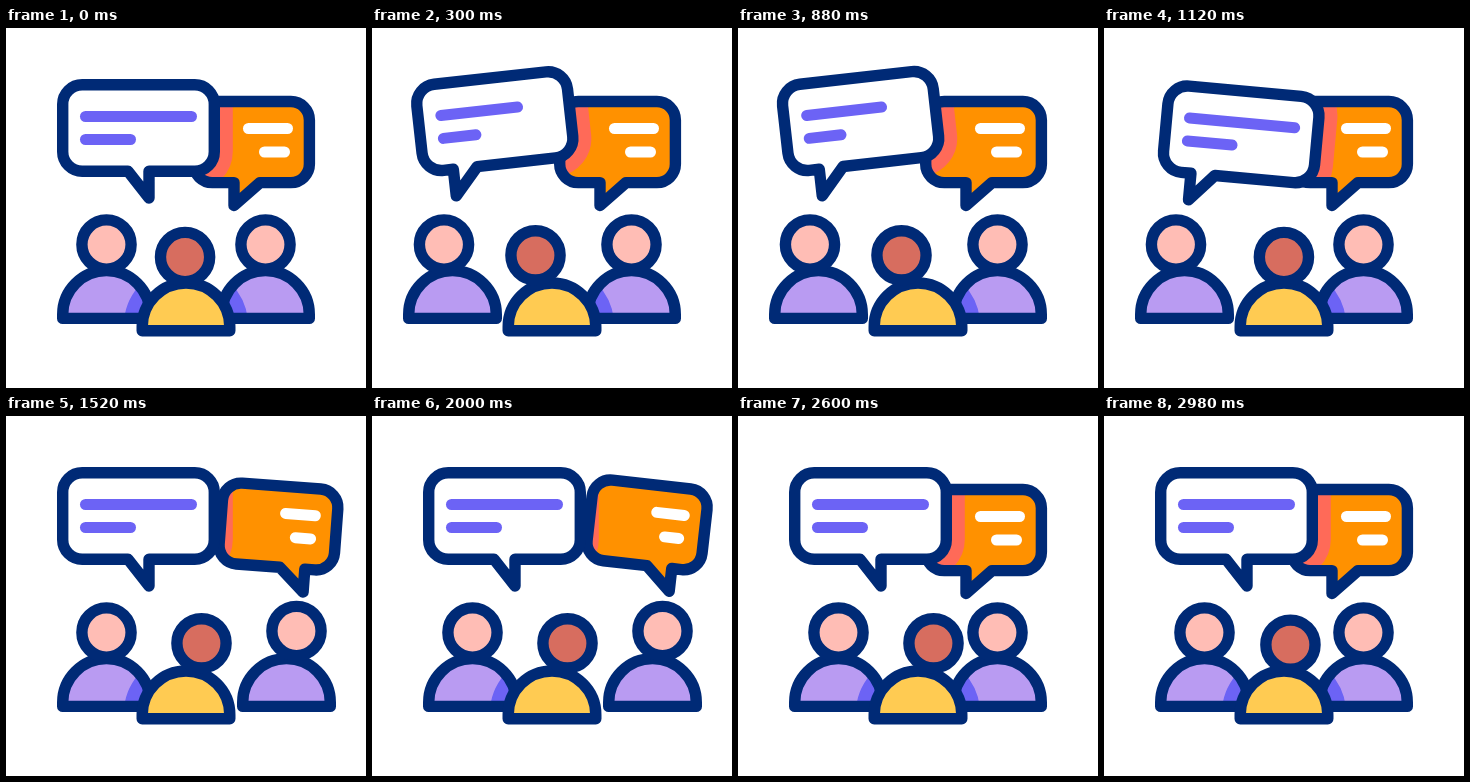
An HTML page that plays this animation: 360 by 360 pixels, repeating every 3 s.

```html
<!DOCTYPE html>
<html>
<head>
<meta charset="utf-8">
<style>
html, body { margin: 0; width: 100%; height: 100%; overflow: hidden; background: #fff; }
svg { display: block; width: 100vw; height: 100vh; }
</style>
</head>
<body>
<svg id="stage" viewBox="0 0 360 360"></svg>
<script>
const LOOP = 3000, TURN = 1120;
const NAVY = '#002a76', LILAC = '#b99bf2', VIOLET = '#6c63f5', PINK = '#ffbdb5';
const stage = document.getElementById('stage');

const sine = p => (1 - Math.cos(Math.PI * p)) / 2;
const cubic = p => p < .5 ? 4 * p ** 3 : 1 - 4 * (1 - p) ** 3;
const clamp = p => Math.min(1, Math.max(0, p));
const mix = (a, b, p) => a + (b - a) * p;

// Eased value at time t from [time, value] pairs
function keys(t, list) {
  let [t0, v0] = list[0];
  for (const [t1, v1] of list) {
    if (t < t1) return t < t0 ? v0 : mix(v0, v1, sine((t - t0) / (t1 - t0)));
    [t0, v0] = [t1, v1];
  }
  return v0;
}

// One speaker's turn: m = step aside, tilt = bubble lean, len = text line length
const speech = (t, lean, back) => ({
  m: keys(t, [[60, 0], [300, 1], [1180, 1], [1420, 0]]),
  tilt: keys(t, [[60, 0], [330, lean], [600, -back], [870, lean], [1160, -back], [1420, 0]]),
  len: keys(t, [[60, 1], [330, .72], [600, 1], [870, .71], [1140, 1]])
});

const outline = (fill, color = NAVY, w = 11.4) =>
  `fill="${fill}" stroke="${color}" stroke-width="${w}" stroke-linejoin="round"`;

// Rounded box with a tail: a and b are its feet, tip its point
function bubble(x0, y0, x1, y1, r, a, b, tip, tipY) {
  const arc = (dx, dy) => `a${r} ${r} 0 0 1 ${dx} ${dy}`;
  return `M${x0 + r} ${y0}H${x1 - r}${arc(r, r)}V${y1 - r}${arc(-r, r)}` +
    `H${b}L${tip} ${tipY}L${a} ${y1}H${x0 + r}${arc(-r, -r)}V${y0 + r}${arc(r, -r)}Z`;
}

const line = (x0, x1, y, color) =>
  `<path d="M${x0} ${y}H${x1}" stroke="${color}" stroke-width="11" stroke-linecap="round"/>`;

const torso = (x, y) => `M${x - 43.8} ${y}v-4a43.8 43.8 0 0 1 87.6 0v4Z`;
const head = (x, y, fill) => `<circle cx="${x}" cy="${y}" r="24.6" ${outline(fill)}/>`;

const centerTorso = torso(180, 302.8);

function listener(x, headX, headY, id) {
  const d = torso(x, 290.4);
  return `<clipPath id="${id}"><path d="${d}"/></clipPath>
    <path d="${d}" fill="${LILAC}"/>
    <g clip-path="url(#${id})"><path d="${centerTorso}" ${outline('none', VIOLET, 37)}/></g>
    <path d="${d}" ${outline('none')}/>` + head(headX, headY, PINK);
}

function draw(t) {
  const L = speech(t, -6.5, -5.8);
  const R = speech(t - TURN, 6.5, 7.2);

  const left = bubble(56.7, 56.7, 208.3, 143.3, 19.5,
    mix(122, 86, L.m), mix(143, 110, L.m), mix(143, 86, L.m), 170);
  const right = bubble(187.7, 73.5, 303.4, 154.6, 18.5,
    mix(228, 250, R.m), mix(254, 275, R.m), mix(228, 275, R.m), 177.5);
  const moveL = `transform="translate(${-1.5 * L.m} 0) rotate(${L.tilt} 66 171)"`;
  const moveR = `transform="translate(${22 * R.m} 0) rotate(${R.tilt} 295 178)"`;

  // The listener in the middle turns to whoever speaks next
  const u = (t + 500) % LOOP;
  const look = 1 + cubic(clamp((u - 1510) / 220)) - cubic(clamp((u - 390) / 220));
  const headX = mix(163.5, 195.5, look);
  const headY = 229 - 1.7 * ((headX - 179.5) / 16) ** 2;

  stage.innerHTML = `
    <clipPath id="card"><path d="${right}" ${moveR}/></clipPath>
    <path d="${right}" fill="#ff9100" ${moveR}/>
    <g clip-path="url(#card)"><path d="${left}" ${outline('none', '#ff6a58', 37)} ${moveL}/></g>
    <g ${moveR}>
      <path d="${right}" ${outline('none')}/>
      ${line(281.5 - 39 * R.len, 281.5, 100.5, '#fff')}
      ${line(278.5 - 20 * R.len, 278.5, 124, '#fff')}
    </g>
    <g ${moveL}>
      <path d="${left}" ${outline('#fff')}/>
      ${line(79.5, 79.5 + 106 * L.len, 88.5, VIOLET)}
      ${line(79.5, 79.5 + 45 * L.len, 111.5, VIOLET)}
    </g>
    ${listener(100.5 - 20 * L.m, 100.5 - 28.5 * L.m, 216.5, 'bodyL')}
    ${listener(259.5 + 21 * R.m, 259.5 + 31 * R.m, 216.5 - 1.5 * R.m, 'bodyR')}
    <path d="${centerTorso}" ${outline('#ffcb52')}/>
    ${head(headX, headY, '#d76d5f')}`;
}

// Looks one cycle back so that the first turn starts from the right-hand speaker
const start = performance.now();
function tick() {
  draw((performance.now() - start) % LOOP);
  requestAnimationFrame(tick);
}
draw(0);
requestAnimationFrame(tick);
</script>
</body>
</html>
```
